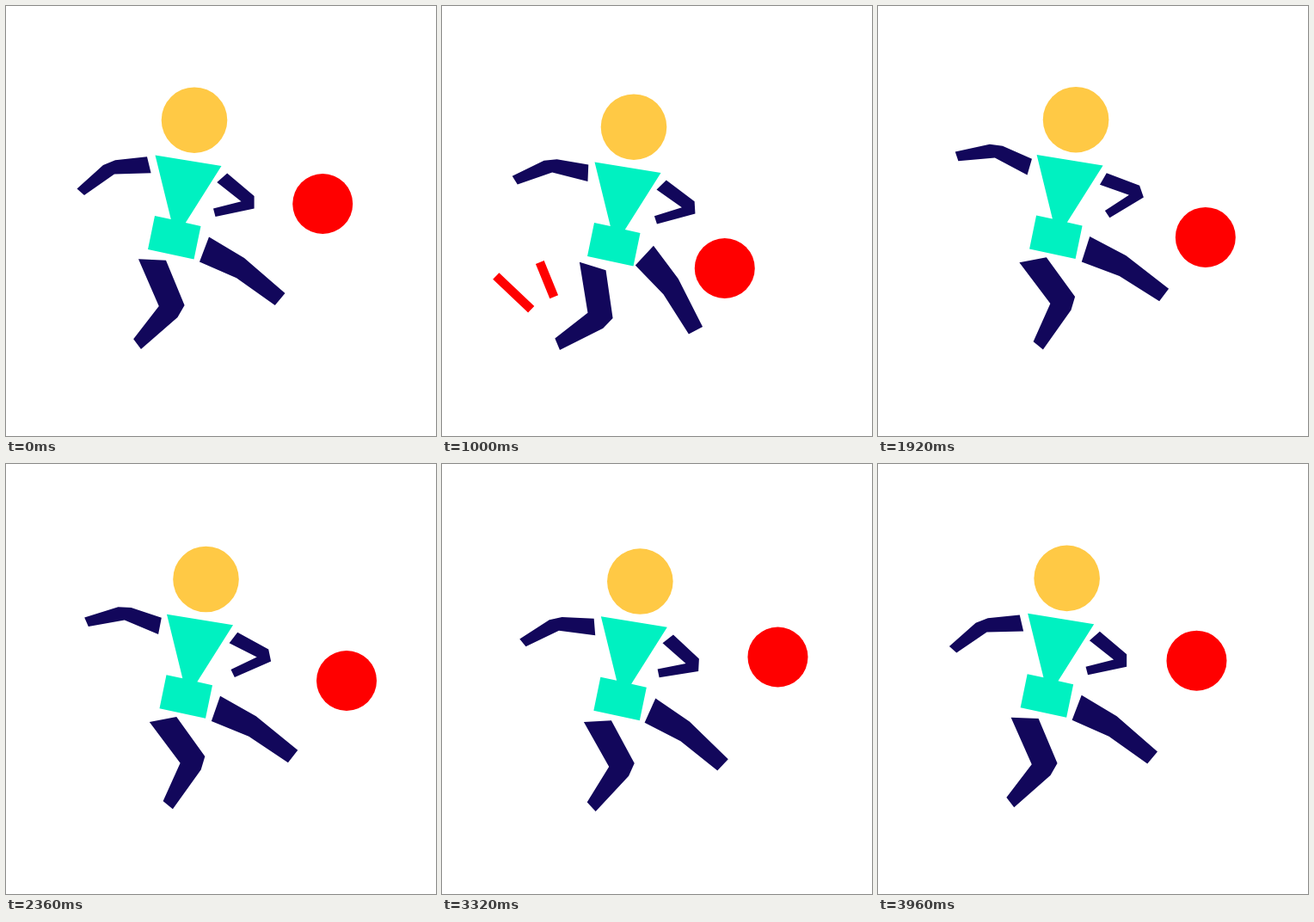
An HTML page for the animation above (4 s loop, 500x500 px).

```html
<!DOCTYPE html>
<html lang="en">
<head>
<meta charset="utf-8">
<title>Runner with ball</title>
<style>
  html, body { margin: 0; width: 100%; height: 100%; overflow: hidden; background: #fff; }
  svg { display: block; width: 100%; height: 100%; }
  .limb { fill: #12075b; }
  .shirt { fill: #00f1c1; }
  .ball { fill: #f00; }
  .head { fill: #ffc945; }
  .dash { stroke: #f00; stroke-width: 10.5; }
</style>
</head>
<body>
<svg viewBox="0 0 500 500">
  <g id="dashes" class="dash">
    <path d="M62.8 314 103.7 352.7M113.8 298 130.2 338.3"/>
  </g>
  <g id="body">
    <circle class="head" cx="219" cy="132.7" r="38.3"/>
    <path class="shirt" d="M173.5 173.5 250.5 186 208.8 252 226.5 256 218.5 294.5 165 283 173 244 191.8 248Z"/>
    <path id="backArm" class="limb" d="M164 175.3 168.6 194.2 126 195.6 91 220 82.5 212.5 113 185 127 179.3Z"/>
    <path id="frontArm" class="limb" d="M257.2 194.6 288.6 221 288.6 235.5 243.5 245 241 235.5 273.5 227.3 245.3 205Z"/>
    <path id="backLeg" class="limb" d="M154 294.3 186 295.8 207.6 348 199.5 362 157 399 148.2 387.3 177.8 349Z"/>
    <path id="frontLeg" class="limb" d="M236 268.5 277 293 324.5 334 312.8 348 268 316.3 225 297.5Z"/>
  </g>
  <circle id="ball" class="ball" r="35"/>
</svg>
<script>
const LOOP = 4000, BEAT = 1000;
const $ = id => document.getElementById(id);

// Four poses, one per beat, blended linearly.
const bodyX = [0, 4, 11.7, 16.7];
const bodyY = [0, 8, -1.2, 5.7];
const limbs = [
  { id: 'backArm',  pivot: [160.5, 184],   turn: [0, 16, 31, 13.5] },
  { id: 'frontArm', pivot: [256, 202],     turn: [0, -3.2, -20.5, 4.4] },
  { id: 'backLeg',  pivot: [172.7, 299.6], turn: [0, 14.3, -16, -8.7] },
  { id: 'frontLeg', pivot: [233.1, 284.8], turn: [0, 22.3, -5.2, 5] },
];

// Ball path as [time, x, y], from one bounce to the next.
const flight = [
  [1000, 328.7, 305], [1520, 361, 285], [2360, 396, 252], [2800, 402.8, 237.5],
  [3320, 390.5, 224.5], [3900, 373.8, 227], [4000, 368.3, 230],
  [4560, 341, 269.3], [5000, 328.7, 305],
];

function pose(values, t) {
  const i = Math.floor(t / BEAT), a = values[i], b = values[(i + 1) % 4];
  return a + (b - a) * (t / BEAT - i);
}

function slope(i, axis) {
  const rate = k => (flight[k + 1][axis] - flight[k][axis]) / (flight[k + 1][0] - flight[k][0]);
  if (i === 0) return rate(0);
  if (i === flight.length - 1) return rate(i - 1);
  const before = flight[i][0] - flight[i - 1][0], after = flight[i + 1][0] - flight[i][0];
  return (rate(i - 1) * after + rate(i) * before) / (before + after);
}

function ballAt(t, axis) {
  const time = t < BEAT ? t + LOOP : t;
  let i = 0;
  while (time > flight[i + 1][0]) i++;
  const [p, q] = [flight[i], flight[i + 1]];
  const span = q[0] - p[0], s = (time - p[0]) / span, r = 1 - s;
  return r * r * (1 + 2 * s) * p[axis] + s * s * (3 - 2 * s) * q[axis]
    + s * r * span * (r * slope(i, axis) - s * slope(i + 1, axis));
}

function draw(now) {
  const t = now % LOOP;
  $('body').setAttribute('transform', `translate(${pose(bodyX, t)} ${pose(bodyY, t)})`);
  for (const { id, pivot, turn } of limbs)
    $(id).setAttribute('transform', `rotate(${pose(turn, t)} ${pivot})`);
  $('ball').setAttribute('cx', ballAt(t, 1));
  $('ball').setAttribute('cy', ballAt(t, 2));
  $('dashes').setAttribute('visibility', t >= 800 && t < 1240 ? 'visible' : 'hidden');
}

const start = performance.now();
function tick() {
  draw(performance.now() - start);
  requestAnimationFrame(tick);
}
tick();
</script>
</body>
</html>
```
